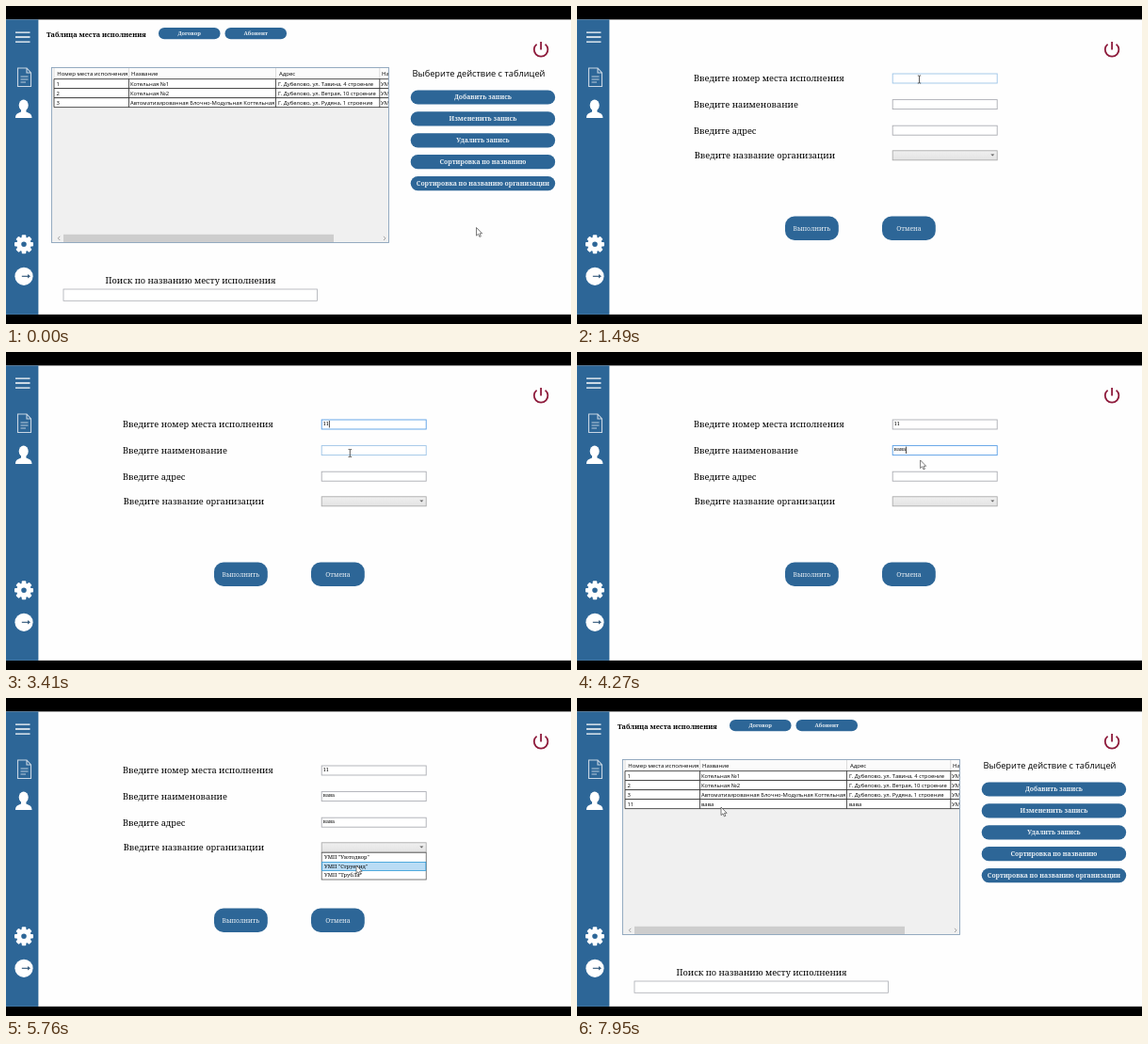
Animation, 600 px wide and 338 px high, one loop 8 s. Source, as an HTML page:

```html
<!DOCTYPE html>
<html lang="ru">
<head>
<meta charset="utf-8">
<title>Места исполнения</title>
<style>
  html, body { margin: 0; width: 100%; height: 100%; overflow: hidden; background: #000; }
  svg { display: block; width: 100%; height: 100%; }
  text { white-space: pre; }
  .serif { font-family: "Noto Serif", serif; }
  .sans { font-family: "Open Sans", sans-serif; }
  .bold { font-weight: 700; }
  .semi { font-weight: 600; }
</style>
</head>
<body>
<svg id="stage" viewBox="0 0 600 338" preserveAspectRatio="none"></svg>
<script>
const LOOP = 8000;
const BLUE = '#2d6697';
const stage = document.getElementById('stage');

// Markup helpers
const rect = (x, y, w, h, fill, more = '') =>
  `<rect x="${x}" y="${y}" width="${w}" height="${h}" fill="${fill}" ${more}/>`;
const line = (d, color, width = 1) =>
  `<path d="${d}" fill="none" stroke="${color}" stroke-width="${width}"/>`;
const text = (x, y, size, str, cls = 'serif', more = '') =>
  `<text x="${x}" y="${y}" font-size="${size}" class="${cls}" ${more}>${str}</text>`;
const group = (id, body) => `<g id="${id}">${body}</g>`;
const pill = (x, y, w, h, r, label, size, cls = 'serif semi') =>
  rect(x, y, w, h, BLUE, `rx="${r}"`) +
  text(x + w / 2, y + h / 2 + size * 0.34, size, label, cls, 'fill="#eaf0f5" text-anchor="middle"');

function sidebar() {
  const teeth = Array.from({ length: 8 }, (_, i) =>
    rect(-2.3, -10, 4.6, 5, '#fff', `rx="1" transform="rotate(${i * 45})"`)).join('');
  return rect(0, 14.4, 34.4, 313.5, BLUE) +
    line('M10 28.1H25.5M10 33H25.5M10 38.1H25.5', '#fff', 1.4) +
    line('M12.5 66H22L26.5 71V85.5H12.5ZM22 66V71H26.5', '#c8d6e3', 1.1) +
    line('M15.5 75H23.5M15.5 78H23.5M15.5 81H21', '#c8d6e3', 0.9) +
    `<ellipse cx="18.7" cy="105.5" rx="5" ry="6" fill="#fff"/>
     <path d="M10 119C10 114.5 13 113.8 16 112.5V109H21.4V112.5C24.5 113.8 27.5 114.5 27.5 119Z" fill="#fff"/>
     <g transform="translate(19 253.3)">${teeth}
       <circle r="5.3" fill="none" stroke="#fff" stroke-width="5"/></g>
     <circle cx="19" cy="287.3" r="9.6" fill="#fff"/>` +
    line('M16.8 287.3H24', '#3a5f80', 1.2) +
    '<path d="M23 285.1L26 287.3L23 289.5Z" fill="#3a5f80"/>';
}

const power = line('M563.6 40.6A7.3 7.3 0 1 0 572.6 40.6M568.1 38V46.5', '#8e1b3c', 1.8);

const cols = [53.5, 132, 289, 398];
const rowTop = i => 77.6 + i * 10;

function row(i, cells) {
  const y = rowTop(i);
  return rect(51, y, 355.5, 10, '#fff') +
    cells.map((c, k) => text(cols[k], y + 7.1, 5.9, c, 'sans')).join('') +
    line(`M51 ${y}H406.5M51 ${y + 10}H406.5M51 ${y}v10M130.5 ${y}v10M286.5 ${y}v10M396.8 ${y}v10`,
      '#2a2a2a', 0.8);
}

function tableScreen() {
  const street = s => `Г. Дубелово, ул. ${s} строение`;
  const rows = [
    ['1', 'Котельная №1', street('Тавина, 4'), 'УМП'],
    ['2', 'Котельная №2', street('Ветрая, 10'), 'УМП'],
    ['3', 'Автоматизированная Блочно-Модульная Коттельная', street('Рудяна, 1'), 'УМП']
  ];
  const heads = ['Номер места исполнения', 'Название', 'Адрес', 'Название'];
  const actions = ['Добавить запись', 'Измененить запись', 'Удалить запись',
    'Сортировка по названию', 'Сортировка по названию организации'];
  return text(43, 33.1, 7.28, 'Таблица места исполнения', 'serif bold') +
    pill(162, 23, 65.5, 12.3, 6.1, 'Договор', 5.7) +
    pill(232.5, 23, 65.5, 12.3, 6.1, 'Абонент', 5.7) +
    rect(48.5, 65.5, 358, 186, '#f0f0f0') +
    '<clipPath id="grid"><rect x="48.5" y="65.5" width="358" height="186"/></clipPath><g clip-path="url(#grid)">' +
    rect(48.5, 65.5, 358, 12.1, '#fbfbfb') +
    line('M51 66V77.6M130.5 66V77.6M286.5 66V77.6M396.8 66V77.6', '#cfcfcf', 0.7) +
    heads.map((h, k) => text(cols[k] + (k ? 1 : 0.8), 74.4, 6.02, h, 'sans')).join('') +
    rows.map((r, i) => row(i, r)).join('') +
    group('added', row(3, ['11', 'вава', 'вава', 'УМП'])) + '</g>' +
    rect(51, 242.8, 355.5, 8.4, '#f0f0f0') +
    rect(61, 242.8, 287, 8.2, '#cdcdcd') +
    line('M57.3 244.8L55.3 246.9L57.3 249M401 244.8L403 246.9L401 249', '#808080', 0.7) +
    rect(48.5, 65.5, 358, 186, 'none', 'stroke="#8aa3bb" stroke-width=".9"') +
    text(431.5, 75.3, 9.27, 'Выберите действие с таблицей', 'sans') +
    actions.map((a, i) => pill(429.7, 89.4 + i * 22.9, 153.5, 15.2, 7.6, a, 6.85)).join('') +
    text(105.5, 295, 9.2, 'Поиск по названию месту исполнения') +
    rect(61, 301, 269.5, 12.3, '#fff', 'stroke="#abadb3" stroke-width=".8"');
}

const fieldY = [72, 99.6, 127.2];
const orgs = ['УМП "Уютодвор"', 'УМП "Струевид"', 'УМП "ТрубЛа"'];

function formScreen() {
  const labels = ['номер места исполнения', 'наименование', 'адрес', 'название организации'];
  return labels.map((l, i) =>
      text(i === 3 ? 124.8 : 124, [80.4, 108.2, 135.8, 162.4][i], 9.25, 'Введите ' + l)).join('') +
    fieldY.map((y, i) =>
      rect(335.2, y, 111, 10, '#fff', `id="box${i}" stroke-width=".9"`) +
      text(336.8, y + 5.8, 5.3, '', 'serif', `id="val${i}"`)).join('') +
    rect(0, 0, 0.7, 7.4, '#000', 'id="caret"') +
    rect(335.2, 153.8, 111, 10, 'url(#combo)', 'stroke="#acacac" stroke-width=".9"') +
    '<path d="M439.3 157.4H443.3L441.3 159.6Z" fill="#606060"/>' +
    group('chosen', text(338, 160.8, 5.65, orgs[1])) +
    pill(221, 223.6, 56.8, 25.4, 10, 'Выполнить', 6.8, 'serif') +
    pill(324, 223.6, 56.8, 25.4, 10, 'Отмена', 6.8, 'serif') +
    group('list',
      rect(335.2, 164.3, 111, 28.7, '#fff', 'stroke="#555" stroke-width=".8"') +
      rect(335.6, 0, 110.2, 9.2, '#b9dcf5', 'id="hot" stroke="#2f9ad6" stroke-width=".8"') +
      orgs.map((o, i) => text(338, 171 + i * 9.6, 5.65, o)).join(''));
}

function dialog() {
  return rect(254, 146, 100.3, 78, '#fff', 'stroke="#777" stroke-width=".8" filter="url(#shade)"') +
    rect(254.4, 200.5, 99.5, 23.1, '#f0f0f0') +
    text(258, 155.6, 5.85, 'Внимание!', 'sans') +
    line('M344 150.8L349 155.8M349 150.8L344 155.8', '#222', 0.8) +
    '<circle cx="273.3" cy="182" r="8" fill="url(#info)" stroke="#b9bec4" stroke-width="1.2"/>' +
    text(273.3, 186.2, 12, 'i', 'serif bold', 'fill="#fff" text-anchor="middle"') +
    text(287, 184.3, 5.7, 'Запись добавлена!', 'sans') +
    rect(307.5, 207.5, 38.5, 11.2, '#e1e1e1', 'stroke="#444" stroke-width="1.1"') +
    text(326.8, 215.2, 6, 'OK', 'sans', 'text-anchor="middle"');
}

stage.innerHTML = `<defs>
  <linearGradient id="combo" x2="0" y2="1"><stop stop-color="#f0f0f0"/><stop offset="1" stop-color="#e3e3e3"/></linearGradient>
  <radialGradient id="info" cy=".3"><stop stop-color="#4f9be0"/><stop offset="1" stop-color="#1a4fa0"/></radialGradient>
  <filter id="shade" x="-10%" y="-10%" width="125%" height="125%"><feDropShadow dx="1" dy="1" stdDeviation="1.5" flood-opacity=".3"/></filter>
  </defs>` +
  rect(0, 0, 600, 338, '#000') + rect(0, 14.4, 600, 313.5, '#fefefe') + sidebar() + power +
  group('table', tableScreen()) + group('form', formScreen()) + group('dialog', dialog()) +
  group('arrow', '<path d="M0 0V8.6L2 6.8L3.4 9.9L4.8 9.3L3.5 6.3H6.1Z" fill="#fff" stroke="#444" stroke-width=".7"/>') +
  group('beam', line('M-1.7 -4H-.4L0 -3.6L.4 -4H1.7M0 -3.6V3.6M-1.7 4H-.4L0 3.6L.4 4H1.7', '#333', 0.8));

const el = {};
stage.querySelectorAll('[id]').forEach(n => el[n.id] = n);
const show = (id, on) => el[id].setAttribute('visibility', on ? 'visible' : 'hidden');
const place = (id, x, y) => el[id].setAttribute('transform', `translate(${x} ${y})`);

// Pointer stops: time, x, y
const path = [
  [0, 499.5, 235.5], [180, 499.5, 235.5], [800, 487, 98], [1000, 486, 97],
  [1430, 363.5, 78], [2750, 363.5, 78], [3300, 365.3, 107.5], [4150, 365.3, 107.5],
  [4480, 363, 132], [4750, 363, 132], [5120, 355, 152.7], [5420, 355, 155],
  [5740, 372, 178], [5930, 372, 178], [6530, 251, 236.3], [7120, 251, 236.3],
  [7380, 326, 212], [7500, 326, 212], [7920, 153, 116], [LOOP, 153, 116]
];
const OPEN_FORM = 1000, LIST_ON = 5400, PICK = 5930, DIALOG_ON = 6720, CLOSE = 7480;
const focusAt = [1650, 3500, 4560, LIST_ON];
const typed = [
  { str: '11', keys: [2250, 2450] },
  { str: 'вава', keys: [3720, 3850, 3980, 4110] },
  { str: 'вава', keys: [4800, 4940, 5080, 5240] }
];

function pointer(t) {
  const i = path.findIndex((p, k) => k && t <= p[0]);
  const [t0, x0, y0] = path[i - 1], [t1, x1, y1] = path[i];
  const u = (t - t0) / (t1 - t0), e = u * u * (3 - 2 * u);
  return [x0 + (x1 - x0) * e, y0 + (y1 - y0) * e];
}

function draw(t) {
  const form = t >= OPEN_FORM && t < CLOSE;
  const modal = t >= DIALOG_ON && t < CLOSE;
  const open = t >= LIST_ON && t < PICK;
  const [x, y] = pointer(t);
  show('table', !form);
  show('added', !form && t >= CLOSE);
  show('form', form);
  show('dialog', modal);
  show('list', open);
  show('hot', open && y > 164);
  show('chosen', form && t >= PICK);
  const item = Math.max(0, Math.min(2, Math.floor((y - 164.5) / 9.6)));
  el.hot.setAttribute('y', 164.8 + item * 9.6);

  const focus = focusAt.filter(f => t >= f).length - 1;
  let over = -1;
  typed.forEach(({ str, keys }, i) => {
    const top = fieldY[i];
    if (form && !modal && !open && x > 335 && x < 446 && y > top && y < top + 10) over = i;
    el['val' + i].textContent = str.slice(0, keys.filter(k => t >= k).length);
    el['box' + i].setAttribute('stroke', focus === i ? '#569de5' : over === i ? '#9cc3e6' : '#abadb3');
  });

  let blink = false;
  if (form && focus >= 0 && focus < 3) {
    const last = Math.max(focusAt[focus], ...typed[focus].keys.filter(k => k <= t));
    // The blink phase restarts with every key
    blink = (t - last) % 960 < 480;
    el.caret.setAttribute('x', 337 + el['val' + focus].getComputedTextLength());
    el.caret.setAttribute('y', fieldY[focus] + 1);
  }
  show('caret', blink);

  show('beam', over >= 0);
  show('arrow', over < 0);
  place('beam', x, y);
  place('arrow', x, y);
}

function tick() {
  draw(performance.now() % LOOP);
  requestAnimationFrame(tick);
}
tick();
</script>
</body>
</html>
```
